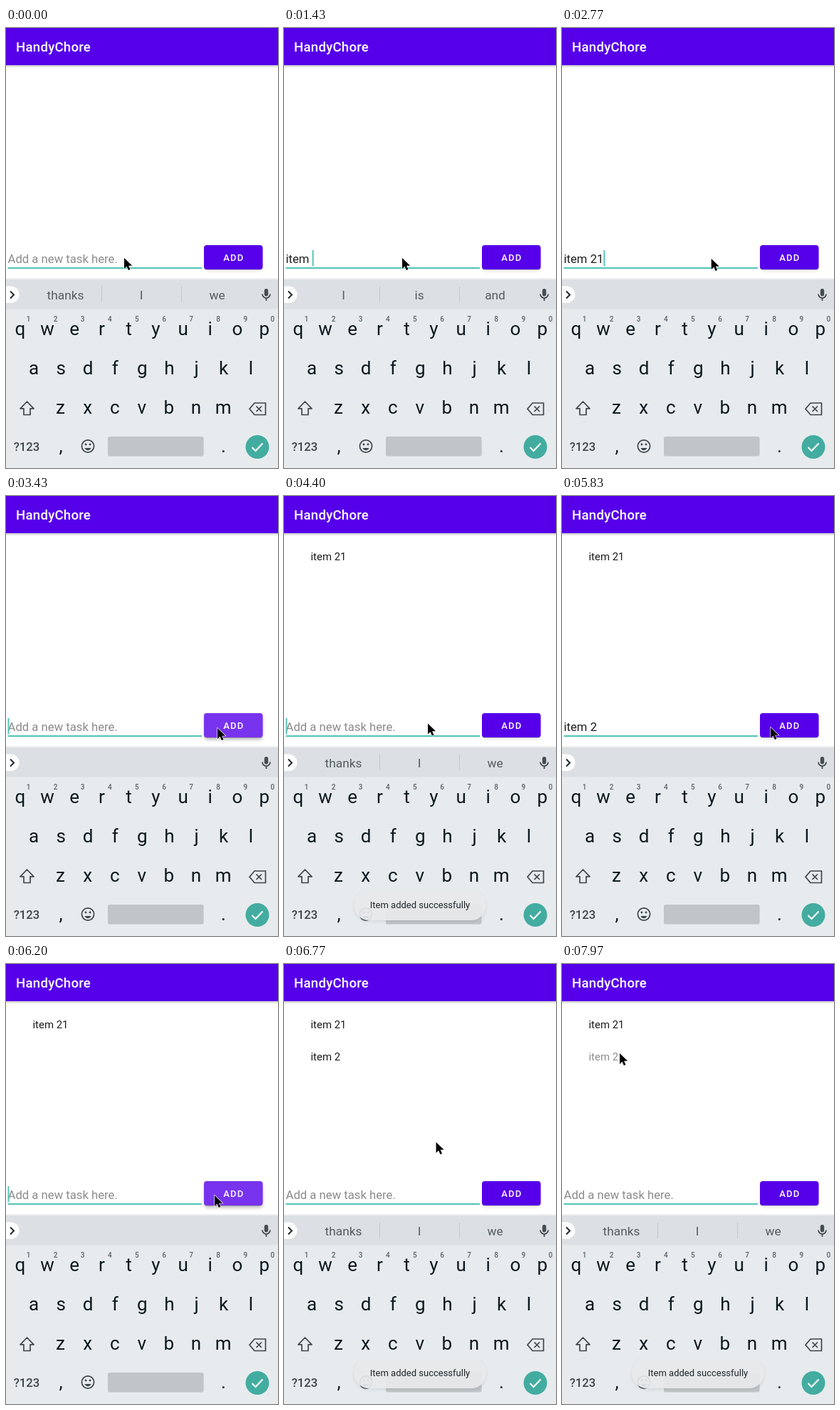
These frames come from a looping animation (382 by 616 pixels, 8000 ms). An HTML page:

```html
<!DOCTYPE html>
<html lang="en">
<head>
<meta charset="utf-8">
<title>HandyChore</title>
<style>
html, body { margin: 0; width: 100%; height: 100%; overflow: hidden; background: #fff }
svg { display: block; font-family: Roboto, sans-serif }
text { white-space: pre }
.mid { text-anchor: middle }
.medium { font-weight: 500 }
.line { fill: none; stroke: #3c464c; stroke-width: 1.7 }
</style>
</head>
<body>
<svg width="382" height="616" viewBox="0 0 382 616">
  <defs>
    <filter id="blur" x="-20%" y="-50%" width="140%" height="200%"><feGaussianBlur stdDeviation="2.5"/></filter>
    <linearGradient id="shade" x2="0" y2="1">
      <stop stop-color="#000" stop-opacity=".22"/><stop offset="1" stop-color="#000" stop-opacity="0"/>
    </linearGradient>
  </defs>
  <rect width="382" height="616" fill="#fff"/>
  <rect y="52" width="382" height="4" fill="url(#shade)"/>
  <rect width="382" height="52" fill="#5600ea"/>
  <text x="14" y="33" class="medium" font-size="18.6" letter-spacing=".25" fill="#fff">HandyChore</text>

  <g font-size="14.9" fill="#1c1c1c">
    <text id="item1" x="37.5" y="89.5">item 21</text>
    <text id="item2" x="37.5" y="134.5">item 2</text>
  </g>

  <text id="field" x="2.5" y="328.5" font-size="16.7"></text>
  <rect x="2.5" y="335" width="272.5" height="2.2" fill="#58c5b8"/>
  <rect id="caret" y="311" width="2" height="22.5" fill="#58c5b8"/>

  <rect id="glow" x="279" y="307" width="81" height="34" rx="4" filter="url(#blur)"/>
  <rect x="278" y="305" width="82.5" height="34" rx="4" opacity=".2"/>
  <rect x="278" y="304" width="82.5" height="34" rx="4" fill="#5600ea"/>
  <rect id="press" x="278" y="304" width="82.5" height="34" rx="4" fill="#fff"/>
  <text x="319.8" y="326" class="mid medium" font-size="13" letter-spacing="1.15" fill="#fff">ADD</text>

  <rect y="350" width="382" height="2" opacity=".06"/>
  <rect y="352" width="382" height="264" fill="#e7ebee"/>
  <rect y="352" width="382" height="41.5" fill="#dce0e4"/>
  <rect x="-12" y="361.5" width="30.5" height="23.5" rx="11.7" fill="#fff"/>
  <path d="M6 368.5l5 5-5 5" class="line" style="stroke:#20282c;stroke-width:2"/>
  <path id="bars" d="M134.5 362v22M246.5 362v22" stroke="#c3c8cb"/>
  <g id="words" class="mid" font-size="17.3" fill="#535c62">
    <text x="83.5" y="380"></text><text x="190" y="380"></text><text x="296.5" y="380"></text>
  </g>
  <rect x="362.8" y="365" width="5.4" height="10.5" rx="2.7" fill="#444d53"/>
  <path d="M360 372.500a5.500 5.500 0 0 0 11 0M365.500 378v4" class="line"/>

  <g id="keys" class="mid" font-size="26" fill="#0b181e"></g>
  <path d="M29.500 523l9.500 9.800h-5v8.700h-9v-8.700h-5z" class="line" stroke-linejoin="round"/>
  <path d="M349 525h15.500v16.500h-15.500l-7-8.250zM351.500 529.500l7.500 7.500m0-7.500l-7.500 7.500" class="line"/>
  <text x="29" y="592" class="mid medium" font-size="16.7" fill="#3c464c">?123</text>
  <circle cx="115" cy="585.500" r="8.600" class="line"/>
  <path d="M110.500 588a4.800 4.800 0 0 0 9 0z" fill="#3c464c"/>
  <circle cx="112" cy="583" r="1.400" fill="#3c464c"/><circle cx="118" cy="583" r="1.400" fill="#3c464c"/>
  <rect x="143" y="573" width="134.500" height="27" rx="2.500" fill="#d3d7da"/>
  <rect x="143" y="572" width="134.500" height="27" rx="2.500" fill="#c1c5c8"/>
  <circle cx="353" cy="586.500" r="16.500" fill="#43aca0"/>
  <path d="M345.500 587l5 5 10-10.500" fill="none" stroke="#fff" stroke-width="2"/>

  <g id="toast">
    <rect x="98" y="553" width="186" height="43" rx="21" opacity=".08" filter="url(#blur)"/>
    <rect x="98" y="551" width="186" height="43" rx="21" fill="#e9ebed" opacity=".92"/>
    <text x="191" y="577" class="mid" font-size="13" fill="#20262a">Item added successfully</text>
  </g>

  <path id="pointer" d="M0 0v15l3.500-3.300 2.400 5.400 2.600-1.100-2.400-5.300h5z" stroke="#fff" stroke-width="1.200" paint-order="stroke"/>
</svg>
<script>
const $ = id => document.getElementById(id);

function addKeys(letters, x, y, digits) {
  [...letters].forEach((c, i) => {
    const cx = x + 38.1 * i;
    $('keys').innerHTML += `<text x="${cx}" y="${y}">${c}</text>` + (digits
      ? `<text x="${cx + 11.5}" y="411" class="medium" font-size="10" fill="#5b646a">${(i + 1) % 10}</text>` : '');
  });
}
addKeys('qwertyuiop', 20, 430, true);
addKeys('asdfghjkl', 39, 485);
addKeys('zxcvbnm', 76.5, 540);
addKeys(',', 77, 594);
addKeys('.', 305.5, 594);

// [time, field text, suggestions]
const idle = ['thanks', 'I', 'we'], none = ['', '', ''];
const onI = ['I', 'in', "I'm"], onIt = ['it', "it's", 'its'];
const onIte = ['item', 'items', 'iter'], onItem = ['item', 'items', "item's"];
const edits = [
  [-500, '', idle], [230, '', idle],
  [800, 'i', onI], [920, 'it', onIt], [1030, 'ite', onIte], [1130, 'item', onItem],
  [1370, 'item ', ['I', 'is', 'and']], [1530, 'item 2', none], [1600, 'item 21', none],
  [3400, '', none],
  [4500, 'i', onI], [4600, 'it', onIt], [4700, 'ite', onIte], [4790, 'item', onItem],
  [4980, 'item ', ['I', 'is', 'and']], [5170, 'item 2', none],
  [6170, '', none]
];

// [start, end, x, y]
const moves = [
  [2500, 3200, 297, 325], [3560, 4080, 202, 318.5],
  [5360, 5430, 257, 307], [5430, 5700, 293, 324], [6480, 7180, 81, 125]
];

const ramp = (t, a, b) => Math.min(1, Math.max(0, (t - a) / (b - a)));
const pulse = (t, a, b, c, d) => ramp(t, a, b) * (1 - ramp(t, c, d));
const smooth = k => k * k * (3 - 2 * k);

function draw(now) {
  const t = now % 8000;
  const [since, typed, hints] = edits.findLast(e => e[0] <= t);
  const field = $('field');
  field.textContent = typed || 'Add a new task here.';
  field.setAttribute('fill', typed ? '#1c1c1c' : '#8b8b8b');
  $('caret').setAttribute('x', 2.5 + (typed ? field.getComputedTextLength() : 0));
  $('caret').style.opacity = +(since >= 0 && (t - since) % 1000 < 500);

  const settled = since === 3400 && t >= 3520 || since === 6170 && t >= 6300;
  const words = settled ? idle : hints;
  [...$('words').children].forEach((w, i) => w.textContent = words[i]);
  $('bars').style.opacity = words[0] ? 1 : 0;

  const press = Math.max(pulse(t, 3240, 3340, 3430, 3680), pulse(t, 6040, 6160, 6210, 6460));
  $('press').style.opacity = .2 * press;
  $('glow').style.opacity = .08 + .2 * press;

  $('item1').style.opacity = ramp(t, 3470, 3600);
  $('item2').style.opacity = pulse(t, 6240, 6370, 7900, 8040);
  $('toast').style.opacity = Math.max(pulse(t, 3500, 3700, 5560, 5800), ramp(t, 6330, 6530));

  let x = 166, y = 322;
  for (const [a, b, toX, toY] of moves) {
    const k = smooth(ramp(t, a, b));
    x += (toX - x) * k;
    y += (toY - y) * k;
  }
  $('pointer').setAttribute('transform', `translate(${x} ${y})`);
  requestAnimationFrame(draw);
}
draw(0);
</script>
</body>
</html>
```
